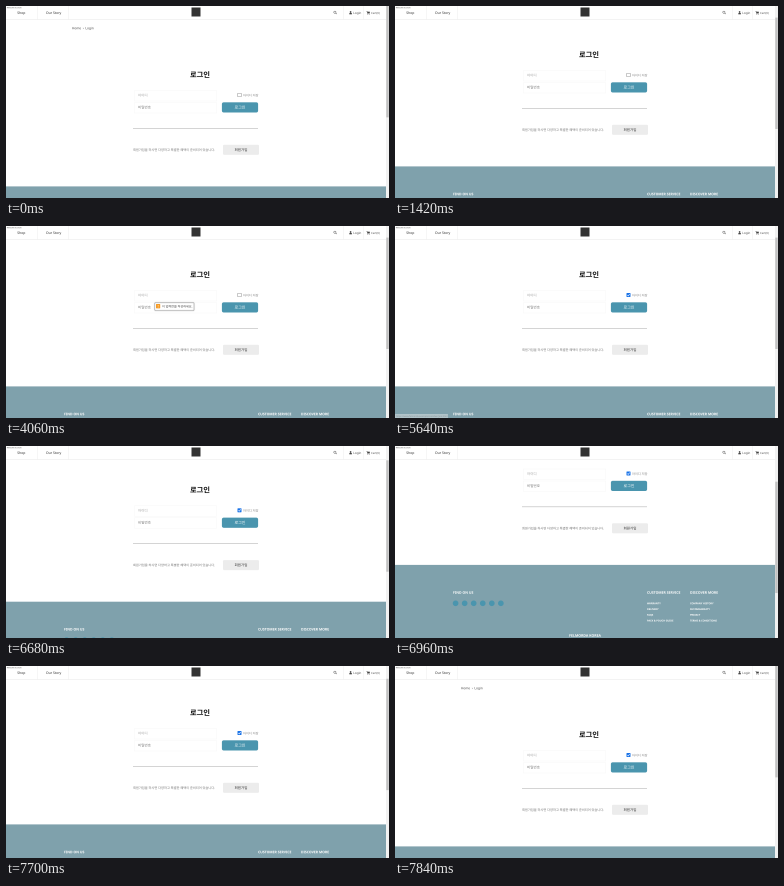
Write an HTML page with a canvas that moves like this. It is 383 px wide and 192 px high and loops after 8 s.

```html
<!DOCTYPE html>
<html lang="ko">
<head>
<meta charset="utf-8">
<title>로그인</title>
<style>
  html, body { margin: 0; width: 100%; height: 100%; overflow: hidden; background: #fff; }
  canvas { display: block; width: 100%; height: 100%; }
</style>
</head>
<body>
<canvas id="stage"></canvas>
<script>
const W = 383, H = 192, LOOP = 8000, STEP = 70;
const PAGE_W = 380, PAGE_H = 331;
const FONT = '"Noto Sans", "Noto Sans CJK KR", "Noto Sans CJK", sans-serif';
const TEAL = '#4a95ae', FOOTER = '#7fa1ac';

// The page is drawn large and scaled down, which keeps tiny text soft and unhinted
const DETAIL = 4;
const stage = document.getElementById('stage');
const view = stage.getContext('2d');
const sheet = document.createElement('canvas');
const ctx = sheet.getContext('2d');

// Each scroll run: start time, then the offset reached at every step
const scrolls = [
  [1210, [5, 13, 18, 20]],
  [6400, [20.2, 20.6, 21.2, 22.2, 24.7, 32, 42, 52.5, 61.5, 70, 77, 80.2]],
  [7560, [70, 46, 22, 6, 0]]
];

function scrollAt(t) {
  let y = 0;
  for (const [start, stops] of scrolls) {
    if (t < start) break;
    y = stops[Math.min(stops.length - 1, Math.floor((t - start) / STEP))];
  }
  return y;
}

const within = (t, a, b) => t >= a && t < b;

function rect(x, y, w, h, color) {
  ctx.fillStyle = color;
  ctx.fillRect(x, y, w, h);
}

function rounded(x, y, w, h, r, fill, stroke, line = 0.4) {
  ctx.beginPath();
  ctx.roundRect(x, y, w, h, r);
  if (fill) { ctx.fillStyle = fill; ctx.fill(); }
  if (stroke) { ctx.strokeStyle = stroke; ctx.lineWidth = line; ctx.stroke(); }
}

function disc(x, y, r, color) {
  ctx.beginPath();
  ctx.arc(x, y, r, 0, Math.PI * 2);
  ctx.fillStyle = color;
  ctx.fill();
}

function path(points, color, width) {
  ctx.beginPath();
  points.forEach(([x, y]) => ctx.lineTo(x, y));
  ctx.strokeStyle = color;
  ctx.lineWidth = width;
  ctx.stroke();
}

// y is the vertical middle of the line of text
function text(str, x, y, size, color, weight = 400, align = 'left') {
  ctx.font = `${weight} ${size}px ${FONT}`;
  ctx.textAlign = align;
  ctx.textBaseline = 'alphabetic';
  ctx.fillStyle = color;
  ctx.fillText(str, x, y + size * 0.36);
}

function drawCheckbox(t) {
  const x = 231.7, y = 87.2;
  if (t < 4320) {
    rounded(x, y, 3.6, 3.6, 0.5, '#fff', within(t, 4190, 4320) ? '#555' : '#777');
    return;
  }
  rounded(x - 0.2, y - 0.2, 4, 4, 0.5, t < 4690 ? '#0b57c4' : '#1a73e8');
  path([[x + 0.7, y + 1.9], [x + 1.5, y + 2.7], [x + 3, y + 0.9]], '#fff', 0.6);
}

function drawForm(t) {
  text('Home  ›  Login', 66, 22, 3.2, '#444', 500);
  text('로그인', 194, 68.7, 7.25, '#111', 700, 'center');

  rounded(128.5, 84.5, 82, 10.5, 0, null, '#f6f6f6');
  rounded(128.5, 96.5, 82, 10.5, 0, null, '#f6f6f6');
  text('아이디', 132, 89.3, 3.5, '#a5a5a5');
  text('비밀번호', 132, 101.3, 3.5, '#777');

  drawCheckbox(t);
  text('아이디 저장', 237, 89.4, 3.2, '#888');

  rounded(215.9, 96.3, 36.2, 10.2, 1.8, TEAL);
  text('로그인', 234, 101.2, 4, '#fff', 500, 'center');

  rect(127, 122.1, 125, 0.5, '#aaa');
  text('회원가입을 하시면 다양하고 특별한 혜택이 준비되어 있습니다.', 127, 143.8, 3.2, '#777');
  rounded(217, 138.8, 36, 10, 1.2, '#ececec');
  text('회원가입', 235, 143.8, 3.5, '#333', 500, 'center');

  if (within(t, 2440, 3000) || within(t, 3560, 4060)) rect(132, 88, 0.3, 3.2, '#222');
}

function drawTooltip(t) {
  if (!within(t, 2580, 4320)) return;
  ctx.save();
  ctx.globalAlpha = t < 4190 ? Math.min(1, (Math.floor((t - 2580) / STEP) + 1) / 5) : 0.35;
  ctx.shadowColor = 'rgba(0,0,0,.3)';
  ctx.shadowBlur = DETAIL;
  rounded(148.8, 96.7, 39.2, 7.8, 0.8, '#fff', '#999');
  ctx.shadowColor = 'transparent';
  rounded(150, 98, 4.2, 4.4, 0.5, '#f59a23');
  text('!', 152.1, 100.3, 3.4, '#fff', 700, 'center');
  text('이 입력란을 작성하세요.', 156, 100.4, 3.05, '#444');
  ctx.restore();
}

function drawList(x, title, items) {
  text(title, x, 208, 3.45, '#fff', 700);
  items.forEach((item, i) => text(item, x, 218.8 + i * 5.75, 2.45, '#fff', 700));
}

function drawFooter() {
  rect(0, 180.4, PAGE_W, PAGE_H - 180.4, FOOTER);
  drawList(58, 'FIND ON US', []);
  for (let i = 0; i < 6; i++) disc(60.6 + i * 9.05, 218.8, 2.8, TEAL);
  drawList(252, 'CUSTOMER SERVICE', ['WARRANTY', 'DELIVERY', 'FAQS', 'PACK & POUCH GUIDE']);
  drawList(295, 'DISCOVER MORE', ['COMPANY HISTORY', 'SUSTAINABILITY', 'PRIVACY', 'TERMS & CONDITIONS']);
  text('FELMORDA KOREA', 190, 251, 3.5, '#fff', 700, 'center');
  text('상호명 : 주식회사 펠모르다 코리아  |  사업자등록번호 : 000-00-00000  |  주소 : 다솜특별시 가온구 누리마루로 00, 새솔빌딩 0층 펠모르다 코리아 본사 (다솜동)  |  대표이사 : 한도윤', 191, 262, 2.75, '#fff', 600, 'center');
  text('통신판매업 신고번호 : 제 0000-다솜가온-0000호  |  개인정보보호책임자 : 한도윤  |  고객센터 : 0000-0000  |  상담시간 : 평일 오전 10시 ~ 오후 5시 (점심시간 및 주말, 공휴일 휴무)', 189, 267.7, 2.8, '#fff', 600, 'center');
}

function drawHeader(t) {
  rect(0, 0, PAGE_W, 13.5, '#fff');
  rect(0, 13.2, PAGE_W, 0.4, '#e2e2e2');
  for (const x of [31, 62.5, 337, 357.5]) rect(x, 0, 0.4, 13.2, '#eaeaea');
  text('Welcome to store', 0.8, 1.7, 1.8, '#333', 500);
  text('Shop', 15.3, 6.9, 3.4, '#333', 500, 'center');
  text('Our Story', 47.6, 6.9, 3.4, '#333', 500, 'center');
  rect(185.5, 1.5, 9, 9, '#333');

  const lens = within(t, 270, 340) ? '#999' : '#555';
  ctx.beginPath();
  ctx.arc(328.9, 6.2, 1.1, 0, Math.PI * 2);
  ctx.strokeStyle = lens;
  ctx.lineWidth = 0.5;
  ctx.stroke();
  path([[329.7, 7], [330.8, 8.1]], lens, 0.5);

  disc(344.6, 5.9, 0.8, '#444');
  rounded(343.3, 6.8, 2.6, 1.5, [1, 1, 0, 0], '#444');
  text('Login', 347.2, 7, 3.1, '#555');

  path([[360.4, 5.4], [361.1, 5.4], [361.7, 7.4], [363.5, 7.4]], '#444', 0.4);
  rect(361.3, 5.7, 2.5, 1.3, '#444');
  disc(361.8, 8.1, 0.4, '#444');
  disc(363.3, 8.1, 0.4, '#444');
  text('Cart(0)', 365, 7, 2.8, '#555');
}

function drawStatus(t) {
  if (!within(t, 5640, 5780)) return;
  ctx.save();
  ctx.globalAlpha = t < 5710 ? 0.5 : 0.8;
  rounded(-1, 188, 54, 5, 0.6, '#e4e7ea');
  text('https://www.felmorda.example/member/join.html', 1, 190.1, 2.2, '#666');
  ctx.restore();
}

function drawScrollbar(y) {
  const ratio = H / PAGE_H;
  rect(PAGE_W, 0, W - PAGE_W, H, '#f1f1f1');
  rect(PAGE_W + 0.3, y * ratio, 2.4, H * ratio, '#c1c1c1');
}

function fit(canvas, w, h) {
  if (canvas.width === w && canvas.height === h) return;
  canvas.width = w;
  canvas.height = h;
}

function draw(t) {
  const w = Math.round(innerWidth * devicePixelRatio);
  const h = Math.round(innerHeight * devicePixelRatio);
  fit(stage, w, h);
  fit(sheet, w * DETAIL, h * DETAIL);
  ctx.setTransform(sheet.width / W, 0, 0, sheet.height / H, 0, 0);
  ctx.textRendering = 'geometricPrecision';
  rect(0, 0, W, H, '#fff');

  const y = scrollAt(t);
  ctx.save();
  ctx.translate(0, -y);
  drawForm(t);
  drawFooter();
  drawTooltip(t);
  ctx.restore();

  drawHeader(t);
  drawStatus(t);
  drawScrollbar(y);

  view.imageSmoothingQuality = 'high';
  view.drawImage(sheet, 0, 0, w, h);
}

const begin = performance.now();
function tick() {
  draw((performance.now() - begin) % LOOP);
  requestAnimationFrame(tick);
}
tick();
</script>
</body>
</html>
```
